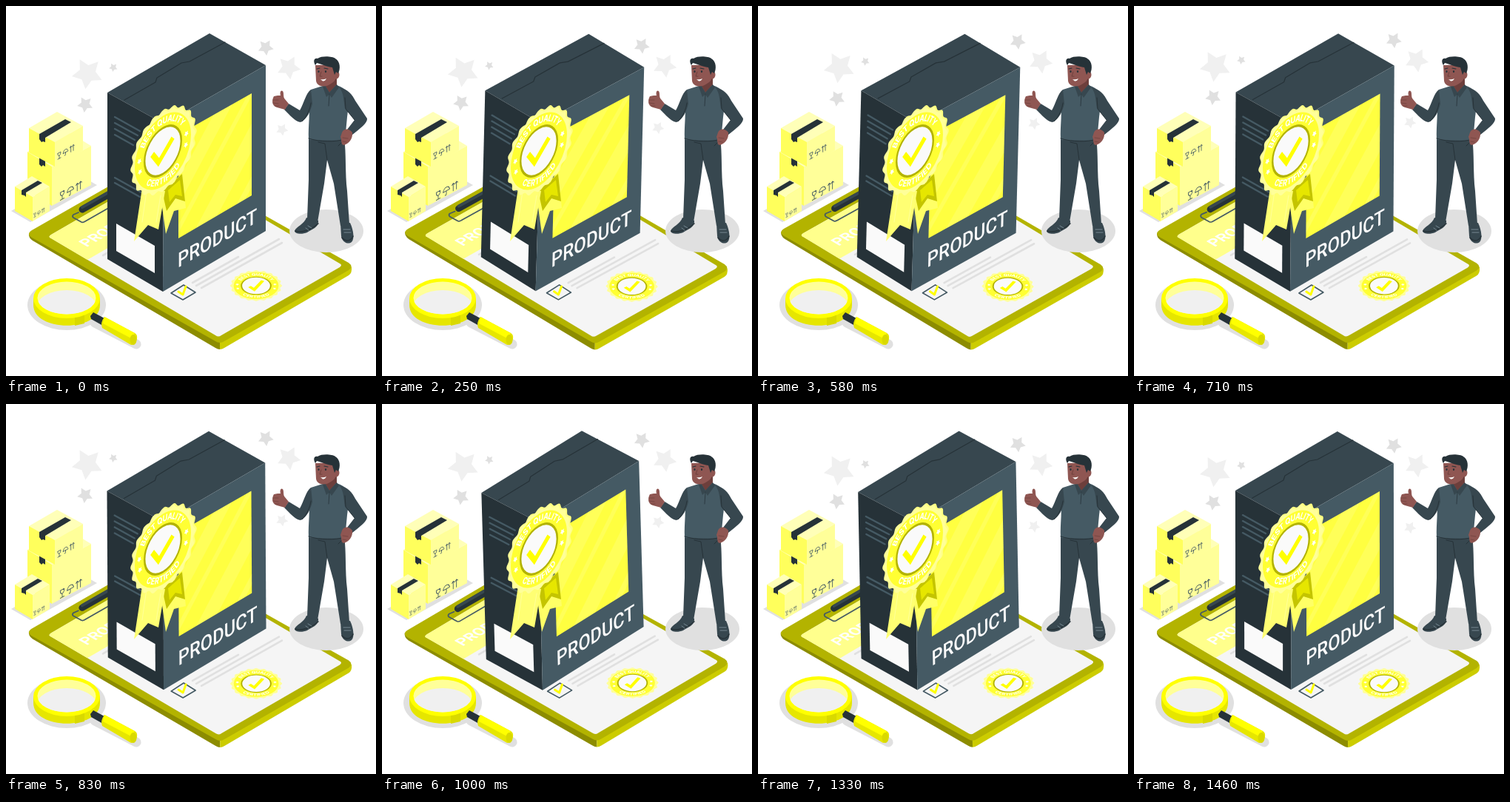
Animation, 500 px wide and 500 px high, one loop 1.5 s. Source, as an HTML page with a canvas:

```html
<!DOCTYPE html>
<html lang="en">
<head>
<meta charset="utf-8">
<title>Certified product</title>
<style>
html, body { margin: 0; width: 100%; height: 100%; overflow: hidden; background: #fff; }
canvas { display: block; width: 100vw; height: 100vh; }
</style>
</head>
<body>
<canvas id="stage"></canvas>
<script>
const SIZE = 500, LOOP = 1500, FRAME = LOOP / 36;
const INK = '#263238', SLATE = '#37474f', STEEL = '#455a64';
const SKIN = '#8f5652', SKIN_DARK = '#6d3f3c';
const YELLOW = '#ffff00', OLIVE = '#b3b300', PAPER = '#f5f5f5';
const canvas = document.getElementById('stage');
const ctx = canvas.getContext('2d');
const ratio = window.devicePixelRatio || 1;
canvas.width = canvas.height = SIZE * ratio;

function fill(path, color) {
  ctx.fillStyle = color;
  ctx.fill(path instanceof Path2D ? path : new Path2D(path));
}

function line(path, color, width = 1) {
  ctx.strokeStyle = color;
  ctx.lineWidth = width;
  ctx.stroke(path instanceof Path2D ? path : new Path2D(path));
}

function oval(x, y, rx, ry) {
  const p = new Path2D();
  p.ellipse(x, y, rx, ry, 0, 0, Math.PI * 2);
  return p;
}

function group(matrix, draw) {
  ctx.save();
  ctx.transform(...matrix);
  draw();
  ctx.restore();
}

function turn(degrees, x, y, draw) {
  ctx.save();
  ctx.translate(x, y);
  ctx.rotate(degrees * Math.PI / 180);
  ctx.translate(-x, -y);
  draw();
  ctx.restore();
}

// Closed outline whose radius depends on the point's index
function radial(count, radius, x = 0, y = 0, start = 0) {
  const p = new Path2D();
  for (let i = 0; i < count; i++) {
    const a = start + i / count * Math.PI * 2, r = radius(i);
    p.lineTo(x + r * Math.cos(a), y + r * Math.sin(a));
  }
  p.closePath();
  return p;
}

const star = (x, y, r, degrees = -47) =>
  radial(10, i => i % 2 ? r * 0.52 : r, x, y, degrees * Math.PI / 180);

const scallop = () => radial(160, i => 53 + 1.8 * Math.cos(i * Math.PI / 4));

function drawStars(lift) {
  group([1, 0, 0, 1, 0, -lift], () => {
    fill(star(110, 91, 21.5), '#f0f0f0');
    fill(star(145, 83, 6), '#e0e0e0');
    fill(star(351, 56, 11, -60), '#e0e0e0');
    fill(star(382, 83, 16.5, -62), '#f0f0f0');
    fill(star(107, 133, 11), '#e0e0e0');
    fill(star(373, 167, 8.5, -62), '#f0f0f0');
  });
}

function arcText(text, radius, center, inward) {
  const dir = inward ? -1 : 1;
  const total = ctx.measureText(text).width;
  let done = 0;
  for (const ch of text) {
    const w = ctx.measureText(ch).width;
    const a = center + dir * (done + w / 2 - total / 2) / radius;
    ctx.save();
    ctx.translate(radius * Math.cos(a), radius * Math.sin(a));
    ctx.rotate(a + dir * Math.PI / 2);
    ctx.fillText(ch, 0, 0);
    ctx.restore();
    done += w;
  }
}

function drawSeal(check) {
  fill(scallop(), '#ffff99');
  fill(oval(0, 0, 47.5, 47.5), '#ffff33');
  ctx.fillStyle = '#fff';
  ctx.font = '700 11.5px Inter, sans-serif';
  ctx.textAlign = 'center';
  ctx.textBaseline = 'middle';
  arcText('BEST QUALITY', 40, -Math.PI / 2, false);
  arcText('CERTIFIED', 40, Math.PI / 2, true);
  for (const a of [-0.12, 0.25, 2.89, 3.26]) {
    fill(star(40 * Math.cos(a), 40 * Math.sin(a), 4), '#fff');
  }
  fill(oval(0, 0, 31, 31), '#fafafa');
  line(oval(0, 0, 31, 31), OLIVE, 3);
  ctx.lineJoin = 'miter';
  ctx.lineCap = 'butt';
  line(check, YELLOW, 7.5);
  ctx.lineJoin = ctx.lineCap = 'round';
}

function label(text, matrix, font, color) {
  group(matrix, () => {
    ctx.font = font;
    ctx.fillStyle = color;
    ctx.textAlign = 'left';
    ctx.textBaseline = 'alphabetic';
    ctx.fillText(text, 0, 0);
  });
}

function drawBoard() {
  fill('M31 307 Q30 313 36 317 L283 462 Q286 464 289 464 V453Z', '#8c8c00');
  fill('M289 453 L467 352 Q468 361 463 364 L295 462 Q292 464 289 464Z', '#cccc00');
  fill('M35 303 L203 207 Q209 204 215 207 L463 347 Q470 352 463 357 L295 453 Q289 457 283 453 L35 313 Q27 308 35 303Z', OLIVE);
  fill('M61 309 L220 217 Q224 215 228 217 L451 348 Q455 350 451 353 L291 445 Q287 448 283 445 L61 314 Q56 312 61 309Z', PAPER);
  fill('M61 309 L220 217 L276 247 L110 343 L61 314 Q56 312 61 309Z', '#ffff8c');
  label('PRODUCT', [0.866, -0.5, 0.866, 0.5, 109, 326], '700 20px Roboto, sans-serif', '#fff');
  line('M131 337 L150 326 M252 374 L314 339 M257 378 L369 315 M264 381 L373 320', '#e0e0e0', 2.6);
  line('M98 279 L91 282 Q89 284 91 286 L102 292 Q104 293 107 291 L142 271', STEEL, 1.7);
  line('M103 275 L140 254', INK, 9);
  line('M103 272 L140 251', SLATE, 4);
  line('M223 388 L240 377 L256 387 L239 397Z', STEEL, 1.6);
  line('M233 386 L239 390 L243 379', YELLOW, 3);
  group([0.64, 0, 0, 0.38, 338, 378], () => drawSeal('M-14 3 L-4 14 L14 -18'));
}

function drawPackage() {
  fill('M137 117 L275 37 L351 80 L213 159Z', SLATE);
  fill('M137 117 L213 159 L212 386 L137 342Z', INK);
  fill('M213 159 L351 80 L351 304 L212 386Z', STEEL);
  line('M160 127 L202 103 L204 97 L237 77 L248 75 L296 49', INK, 1.2);
  line('M147 150 L181 169 M147 158 L178 175 M147 166 L174 181 M147 174 L172 188 M147 232 L183 252 M147 239 L181 258', STEEL, 2.3);
  const panel = new Path2D('M233 174 L332 118 L332 256 L233 314Z');
  fill(panel, '#ffff40');
  ctx.save();
  ctx.clip(panel);
  for (const [x, w] of [[190, 18], [222, 6], [248, 20], [286, 8], [312, 14]]) {
    fill(`M${x} 316 L${x + 110} 110 h${w} L${x + w} 316Z`, 'rgba(255,255,255,.13)');
  }
  ctx.restore();
  fill('M149 294 L201 324 L201 361 L149 331Z', '#fafafa');
  label('PRODUCT', [0.866, -0.5, 0, 1, 232, 354], '500 27.5px Roboto, sans-serif', '#fafafa');
}

function drawBadge() {
  fill('M208 250 L216 308 L227 277 L243 273 L238 227Z', '#ffff66');
  fill('M211 250 L217 277 L229 260 L242 264 L238 227Z', '#c4c400');
  fill('M219 249 L221 265 L229 255 L238 257 L235 235Z', '#e6e600');
  fill('M184 246 L173 318 L192 296 L206 302 L215 250Z', '#ffff73');
  line('M190 250 L184 292 M209 256 L203 292', '#ffff99', 1);
  const face = (x, y) => [0.8, -0.47, 0, 1, x, y];
  group(face(214, 194), () => fill(scallop(), '#ffff80'));
  group(face(212, 196), () => drawSeal('M-18 -4 L-7 12 L17 -10'));
}

function drawIcons(x, y, scale, gap) {
  const icons = [
    'M-3 -10 H3 Q3 -5 0 -5 Q-3 -5 -3 -10 M0 -5 V0 M-3 0 H3',
    'M-5 -5 Q-4 -10 0 -10 Q4 -10 5 -5Z M0 -5 V-1 Q0 1 -2 0',
    'M-2 0 V-10 M-4 -8 L-2 -10 L0 -8 M3 0 V-10 M1 -8 L3 -10 L5 -8'
  ];
  icons.forEach((icon, i) =>
    group([0.866 * scale, -0.5 * scale, 0, scale, x + i * gap, y - i * gap * 0.56], () => line(icon, STEEL, 1)));
}

function drawCarton([lx, ly], [fx, fy], [rx, ry], height) {
  fill(`M${lx} ${ly} L${lx + rx - fx} ${ly + ry - fy} L${rx} ${ry} L${fx} ${fy}Z`, '#ffffb8');
  fill(`M${lx} ${ly} L${fx} ${fy} v${height} L${lx} ${ly + height}Z`, '#ffff5c');
  fill(`M${fx} ${fy} L${rx} ${ry} v${height} L${fx} ${fy + height}Z`, '#ffff99');
}

function drawCartons() {
  fill('M7 277 L33 292 L123 242 L95 226Z', '#e0e0e0');
  drawCarton([29, 197], [62, 217], [115, 189], 53);
  fill('M45 204 L53 204 V217 L50 215 L48 217 L45 214Z', INK);
  drawIcons(76, 261, 1.02, 11);
  drawCarton([31, 165], [66, 184], [104, 162], 33);
  fill('M45 173 L80 153 L88 157 L53 178 V184 L50 183 L48 184 L45 180Z', INK);
  drawIcons(72, 206, 0.78, 8.5);
  drawCarton([12, 244], [36, 258], [59, 244], 33);
  fill('M21 249 L43 236 L49 239 L27 252 V258 L25 256 L21 255Z', INK);
  drawIcons(39, 285, 0.5, 5.5);
}

function drawMan() {
  fill(oval(433, 304, 50, 29), '#e0e0e0');
  fill('M406 286 L422 290 C423 299 413 302 407 306 C400 309 390 308 390 304 C392 298 403 295 406 286Z', SLATE);
  fill('M452 294 L465 293 C470 304 471 315 467 319 C462 323 454 319 453 311Z', SLATE);
  line('M391 304 C399 307 412 303 422 294 M454 313 C459 319 466 318 469 311', INK, 1.5);
  line('M408 297 l5 3 M405 300 l4 3 M456 302 h9 M457 306 h9', '#90a4ae', 0.7);
  fill('M409 178 L457 178 C460 200 458 225 461 250 L464 295 L452 297 L443 240 L434 208 L430 240 L421 292 L407 288 L409 235Z', SLATE);
  line('M434 208 L431 186 L422 184 M455 183 L449 189', INK);
  fill('M431 98 L447 96 L447 110 L437 119 L431 110Z', SKIN_DARK);
  fill('M412 113 L431 107 L437 117 L446 107 C456 109 463 116 464 126 L461 150 L458 182 L409 181 C408 160 412 142 408 130Z', STEEL);
  fill('M412 113 C405 118 402 133 397 141 L382 132 L376 140 C384 148 392 157 398 157 C407 153 412 141 414 132Z', SLATE);
  fill('M450 110 C462 112 468 120 472 128 L488 152 C489 158 478 166 468 174 L461 167 L471 154 L458 138 C456 128 457 117 450 110Z', SLATE);
  line('M412 131 C411 140 406 150 400 156 M458 124 L459 139 L471 154 M409 179 C425 184 444 184 458 180', INK);
  fill('M430 106 L437 117 L447 106 L450 110 L440 124 L437 119 L433 123 L428 109Z', SLATE);
  line('M437 119 L436 135', INK, 0.8);

  fill('M362 122 C359 127 359 135 366 137 L377 140 L382 132 L377 126 C374 123 376 118 374 115 C371 113 370 117 371 121 L367 121Z', SKIN);
  line('M361 127 L368 127 M361 131 L368 132 M364 135 L369 135', SKIN_DARK, 0.7);
  fill('M454 171 C456 165 464 165 468 171 C469 179 463 187 456 188 C452 187 454 180 452 177Z', SKIN);
  line('M455 178 L462 179 M455 183 L460 184', SKIN_DARK, 0.7);

  fill(oval(446, 93, 4.5, 5.5), SKIN);
  fill('M418 80 L446 79 C449 93 446 102 439 105 C431 111 420 109 419 101Z', SKIN);
  fill('M418 80 C415 75 416 70 421 71 C427 67 441 68 445 71 C452 75 452 85 449 91 L446 89 L444 93 L441 83 C433 82 425 78 420 77Z', INK);
  fill(oval(422.5, 88.5, 1.1, 1.6), INK);
  fill(oval(432, 88.5, 1.1, 1.6), INK);
  line('M420 85 L424 84 M430 84 L435 85', INK, 1.1);
  line('M426 89 L424 95 L427 95', SKIN_DARK, 0.9);
  fill('M425 99 Q429 100 433 98 Q431 102 428 101.5Z', '#fafafa');
}

function drawMagnifier() {
  fill(oval(82, 404, 53, 34), '#e0e0e0');
  line('M120 428 L176 457', '#e0e0e0', 13);
  fill('M37 395 V404 C37 441 127 441 127 404 V395Z', '#e6e600');
  fill('M93 415 L106 415 V429 L93 432Z', '#d9d900');
  fill(oval(82, 395, 45, 27), YELLOW);
  const lens = oval(82, 394.5, 39.5, 22);
  fill(lens, '#ffff99');
  ctx.save();
  ctx.clip(lens);
  fill(oval(82, 408, 41, 24), '#f0f0f0');
  ctx.restore();
  fill('M114 419 L118 414 L133 422 L131 432 L115 423Z', INK);
  fill('M133 420 L174 442 Q178 444 177 450 Q175 458 169 458 L130 435 Q127 428 133 420Z', '#e6e600');
  fill('M133 420 L174 442 L169 449 L131 429Z', YELLOW);
  fill(oval(172, 451, 4.5, 7), '#d9d900');
}

const ease = p => (1 - Math.cos(Math.PI * p)) / 2;

// Eased zero, +1 at a quarter, -1 at three quarters, zero
function sway(p) {
  if (p < 0.25) return ease(p * 4);
  if (p < 0.75) return 1 - 2 * ease(p * 2 - 0.5);
  return ease(p * 4 - 3) - 1;
}

function render(now) {
  const p = Math.floor(now % LOOP / FRAME) * FRAME / LOOP;
  const swing = sway(p);
  ctx.setTransform(ratio, 0, 0, ratio, 0, 0);
  ctx.fillStyle = '#fff';
  ctx.fillRect(0, 0, SIZE, SIZE);
  ctx.lineJoin = ctx.lineCap = 'round';
  drawStars(10 * ease(2 * p));
  drawCartons();
  turn(0.75 * swing, 249, 334, drawBoard);
  turn(1.9 * swing, 244, 211, drawPackage);
  drawBadge();
  drawMan();
  drawMagnifier();
}

const start = performance.now();
function tick() {
  render(performance.now() - start);
  requestAnimationFrame(tick);
}
tick();
</script>
</body>
</html>
```
